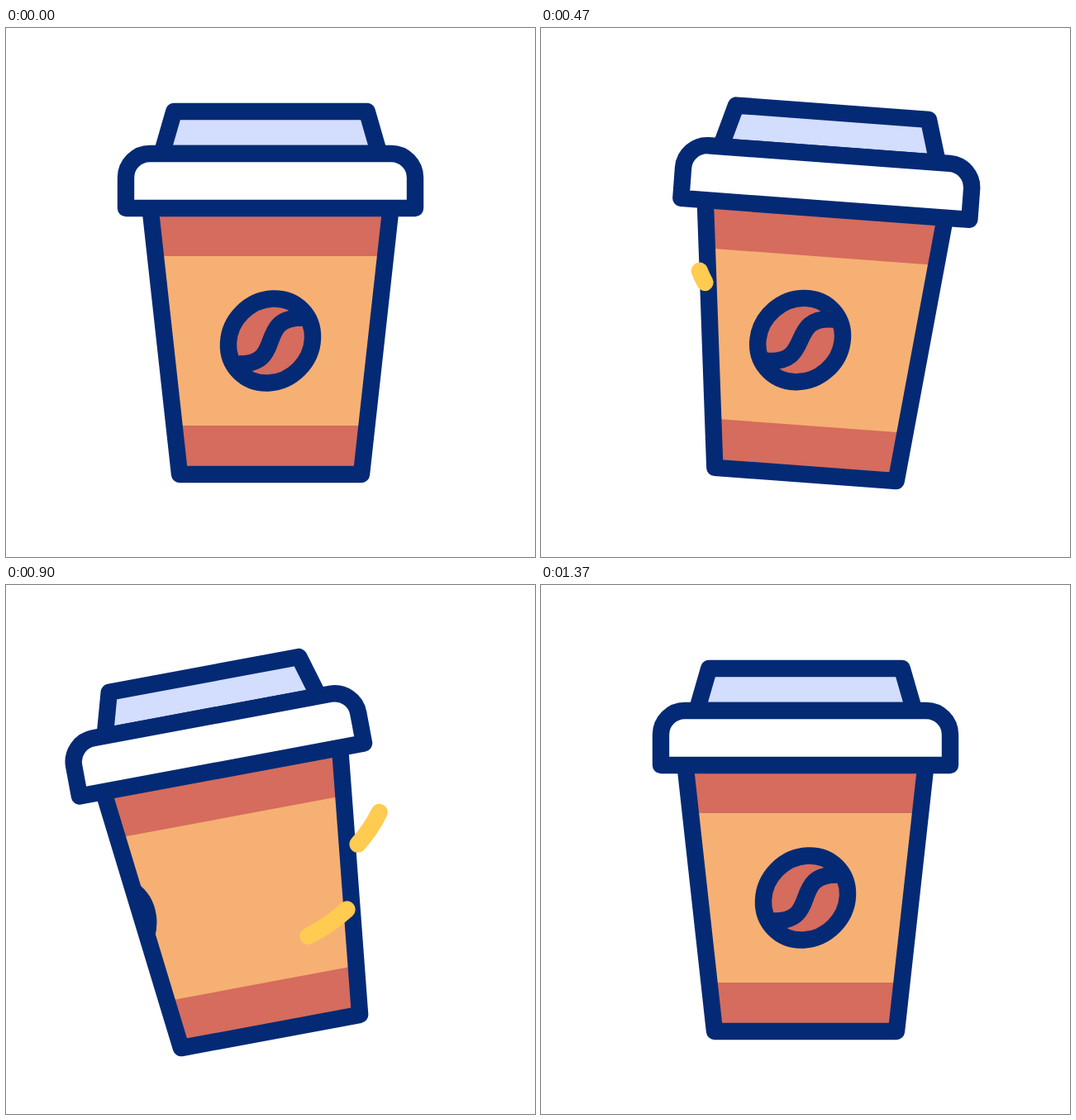
An HTML page for the animation above (2000 ms loop, 640 px wide and 640 px high).

```html
<!DOCTYPE html>
<html lang="en">
<head>
<meta charset="utf-8">
<title>Coffee cup</title>
<style>
  html, body { margin: 0; width: 100%; height: 100%; overflow: hidden; background: #fff; }
  svg { display: block; width: 100%; height: 100%; }
  .line { stroke: #042a75; stroke-width: 20.4; stroke-linecap: round; stroke-linejoin: round; }
  .swoosh { fill: none; stroke: #ffcb50; stroke-width: 20.4; stroke-linecap: round; }
</style>
</head>
<body>
<svg viewBox="0 0 640 640">
  <clipPath id="inside"><path d="M174.5 218L210 540H430L465.5 218Z"/></clipPath>
  <g id="cup">
    <g clip-path="url(#inside)">
      <path fill="#d56c5d" d="M160 218H480V540H160Z"/>
      <path fill="#f7b073" d="M160 276H480V481H160Z"/>
      <g id="bean" class="line" fill="none">
        <ellipse cx="320" cy="378.5" rx="53.4" ry="48.6" fill="#d56c5d" transform="rotate(-45 320 378.5)"/>
        <path d="M358 350.500C302 350.500 338 406.500 282 406.500"/>
      </g>
    </g>
    <path class="line" fill="none" d="M174.500 218L210 540H430L465.500 218"/>
    <path class="line" fill="#d3ddfe" d="M188.500 152L203.200 101H436.800L451.500 152Z"/>
    <path class="line" fill="#fff" d="M145 218V181A29 29 0 0 1 174 152H466A29 29 0 0 1 495 181V218Z"/>
    <path class="swoosh" id="upper" pathLength="1" d="M174 304C190 338 226 370 273 379.500C345 392 448 372 498 303.500"/>
    <path class="swoosh" id="lower" pathLength="1" d="M200 411C270 455 366 456 438 412"/>
  </g>
</svg>
<script>
const FPS = 30, LOOP = 2000;
const $ = id => document.getElementById(id);

// Keys are [frame, value] pairs, eased in and out between neighbours.
const tilt = [[0, 0], [8.65, -15], [18.4, 18.6], [28.3, -12], [38.1, 0]];
const slideOut = [[0, 0], [10.1, -92.5], [21.6, 185]];
const slideIn = [[24.2, -185], [41, 0]];

function valueAt(keys, f) {
  const next = keys.findIndex(key => key[0] > f);
  if (next === 0) return keys[0][1];
  if (next < 0) return keys[keys.length - 1][1];
  const [f0, v0] = keys[next - 1], [f1, v1] = keys[next];
  const u = (f - f0) / (f1 - f0);
  return v0 + (v1 - v0) * u * u * (3 - 2 * u);
}

function trim(id, f, headStart, tailStart) {
  const head = valueAt([[headStart, 0], [headStart + 9, 1]], f);
  const tail = valueAt([[tailStart, 0], [tailStart + 10, 1]], f);
  const style = $(id).style;
  style.display = head - tail > 0.001 ? "" : "none";
  style.strokeDasharray = `${head - tail} 3`;
  style.strokeDashoffset = -tail;
}

function draw(now) {
  const f = Math.floor((now % LOOP) * FPS / 1000 + 0.15);
  $("cup").setAttribute("transform", `rotate(${valueAt(tilt, f)} 320 540)`);
  $("bean").setAttribute("transform", `translate(${valueAt(f < 23 ? slideOut : slideIn, f)} 0)`);
  trim("upper", f, 12.9, 19.2);
  trim("lower", f, 16.3, 20.1);
}

const start = performance.now();
function tick() {
  draw(performance.now() - start);
  requestAnimationFrame(tick);
}
tick();
</script>
</body>
</html>
```
